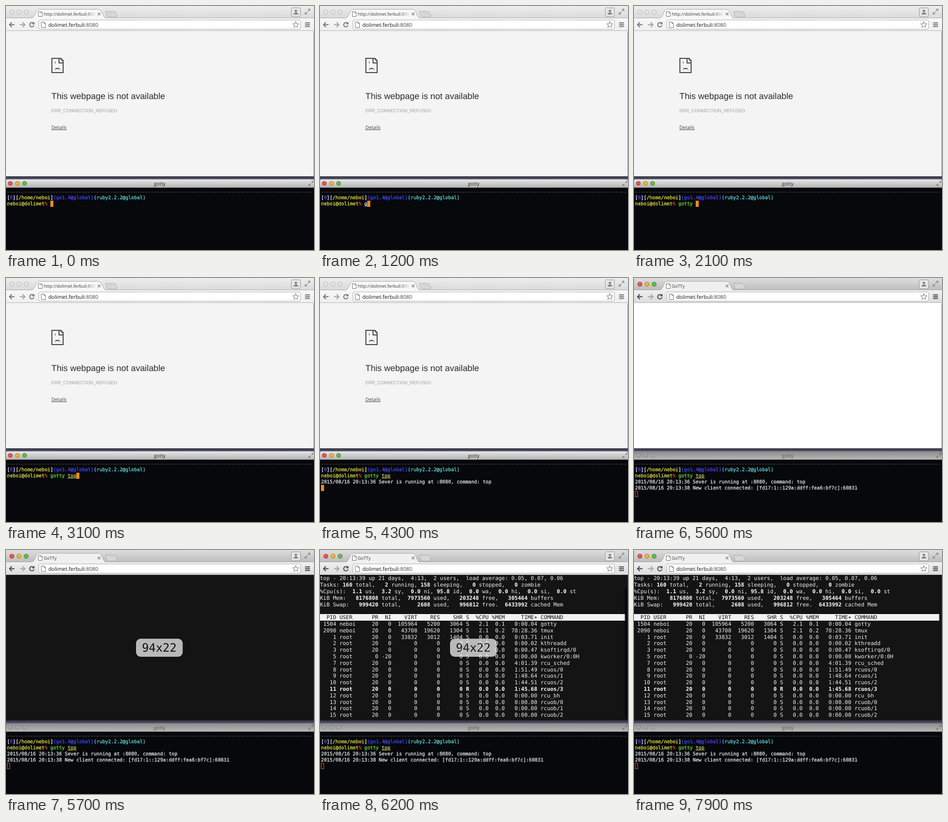
Animation of 604 by 480 pixels, one loop 8000 ms. Source, as an HTML page:

```html
<!DOCTYPE html>
<html lang="en">
<head>
<meta charset="utf-8">
<title>Terminal in the browser</title>
<style>
html, body { margin: 0; width: 604px; height: 480px; overflow: hidden; background: #07080c; }
svg { display: block; }
text { white-space: pre; text-rendering: geometricPrecision; }
.ui { font-family: "Open Sans", "Noto Sans", sans-serif; }
.err { font-family: "Liberation Sans", Arial, sans-serif; }
.mono { font-family: "DejaVu Sans Mono", monospace; }
.line { fill: none; stroke-linecap: round; stroke-linejoin: round; }
#shell { font-size: 9.41px; color: #dadada; }
#shell text, #shell tspan { fill: currentColor; stroke: currentColor; stroke-width: .35px; }
#top { font-size: 10.57px; fill: #f0f0f0; }
#top .b { font-weight: bold; fill: #fff; }
#top .head { fill: #111; }
.yellow { color: #d6d63e; }
.blue { color: #4343f5; }
.cyan { color: #5ad2d2; }
.red { color: #d8321e; }
.green { color: #62d234; }
.path { color: #c4cc5e; }
.white { color: #e8e8e8; }
.under { text-decoration: underline; }
#shell .under { text-decoration: underline .6px #9a9a48; }
</style>
</head>
<body>
<svg width="604" height="480" viewBox="0 0 604 480">
  <defs>
    <linearGradient id="stripOff" x2="0" y2="1"><stop stop-color="#ededed"/><stop offset="1" stop-color="#dadada"/></linearGradient>
    <linearGradient id="stripOn" x2="0" y2="1"><stop stop-color="#dedede"/><stop offset="1" stop-color="#bcbcbc"/></linearGradient>
    <linearGradient id="barOff" x2="0" y2="1"><stop stop-color="#f7f7f7"/><stop offset="1" stop-color="#efefef"/></linearGradient>
    <linearGradient id="barOn" x2="0" y2="1"><stop stop-color="#f0f0f0"/><stop offset="1" stop-color="#dcdcdc"/></linearGradient>
    <linearGradient id="titleOn" x2="0" y2="1"><stop stop-color="#e6e6e6"/><stop offset="1" stop-color="#b4b4b4"/></linearGradient>
    <linearGradient id="titleOff" x2="0" y2="1"><stop stop-color="#8c8c8c"/><stop offset="1" stop-color="#b6b6b6"/></linearGradient>
    <linearGradient id="gap" x2="0" y2="1"><stop stop-color="#2c2d3a"/><stop offset="1" stop-color="#626680"/></linearGradient>
    <linearGradient id="fade" gradientUnits="userSpaceOnUse" x1="74" x2="177"><stop offset=".8" stop-color="#333"/><stop offset="1" stop-color="#333" stop-opacity="0"/></linearGradient>
    <clipPath id="tabClip"><path d="M74 8H176V23H74Z"/></clipPath>
  </defs>

  <!-- shell window -->
  <rect y="335" width="604" height="7" fill="url(#gap)"/>
  <rect y="357" width="604" height="123" fill="#07080c"/>
  <path id="shellBar" d="M0 357V344Q0 341 3 341H601Q604 341 604 344V357Z"/>
  <path d="M0 357.5H604" stroke="#4b4b4b"/>
  <g id="shellLights"></g>
  <text id="shellTitle" class="ui" x="301.5" y="352.5" font-size="9.7" text-anchor="middle">gotty</text>
  <path class="line" stroke="#666" d="M599 348L602 345M599.5 345H602V347.5M597 350L594 353M594 350.5V353H596.5"/>
  <path d="M2 366.3H602" stroke="#4b4b40" stroke-dasharray="3.8 1.86"/>
  <g id="shell" class="mono">
    <text x="2" y="380"><tspan class="white">[</tspan><tspan class="blue">0</tspan><tspan class="white">][</tspan><tspan class="yellow">/home/neboi</tspan><tspan class="white">]</tspan><tspan class="blue">(go1.4@global)</tspan><tspan class="cyan">(ruby2.2.2@global)</tspan></text>
    <text x="2" y="392"><tspan class="yellow">neboi@dolimet</tspan><tspan class="red">%</tspan> <tspan id="cmd"></tspan><tspan id="arg" class="path under"></tspan></text>
    <text id="log1" x="2" y="404">2015/08/16 20:13:36 Sever is running at :8080, command: top</text>
    <text id="log2" x="2" y="416">2015/08/16 20:13:38 New client connected: [fd17:1::129a:ddff:fea6:bf7c]:60831</text>
  </g>
  <rect id="cursor" stroke="#f08c1e"/>

  <!-- browser window -->
  <rect id="strip" width="604" height="24"/>
  <g id="lights"></g>
  <path d="M196 10.5H212Q214 10.5 215 12.5L217.5 19Q218 21.5 215.5 21.5H202Q199 21.5 198 19L195.5 12.5Q195 10.5 196 10.5Z" fill="#d6d6d6" stroke="#a9a9a9" stroke-width=".8"/>
  <path d="M0 23.5H604" stroke="#adadad"/>
  <rect id="bar" y="24" width="604" height="25"/>
  <path id="tab" d="M50 24Q54 23 56 18.5L60 9.5Q61 6.5 64 6.5H182Q185 6.5 186.5 9.5L191 19Q192.5 23 196 24" stroke="#a4a4a4" stroke-width=".9"/>
  <g class="line" stroke="#777">
    <path d="M64 11H68.5L71 13.5V20.5H64ZM68.5 11V13.5H71" fill="#fff"/>
    <path d="M180.2 13.5L184.8 18.1M184.8 13.5L180.2 18.1" stroke-width="1.1"/>
  </g>
  <g clip-path="url(#tabClip)">
    <text id="tabText" class="ui" x="74" y="19" font-size="8.6"></text>
  </g>
  <rect x="559.5" y="3.5" width="18" height="17.5" rx="2" fill="#e4e4e4" stroke="#9c9c9c"/>
  <circle cx="568.5" cy="9.7" r="2.3" fill="#777"/>
  <path d="M564 16.5Q564 13 568.5 13T573 16.5Z" fill="#777"/>
  <path class="line" stroke="#858585" stroke-width="1.2" d="M592 10L596 6M592.5 6H596V9.5M590.5 12L586.5 16M586.5 12.5V16H590"/>

  <g class="line" stroke-width="1.9">
    <path id="back" d="M16 36.8H7M11 32.5L6.8 36.8L11 41"/>
    <path d="M28 36.8H37M33 32.5L37.2 36.8L33 41" stroke="#a3a3a3"/>
    <path id="reload" d="M54 34A4.3 4.3 0 1 0 54.7 38.5"/>
    <path id="menu" stroke-linecap="butt" d="M586.5 33.2H596M586.5 36.7H596M586.5 40.2H596"/>
  </g>
  <path id="reloadTip" d="M55.8 31V36H50.8Z"/>
  <rect x="64.5" y="27.5" width="513" height="18" rx="2.5" fill="#fff" stroke="#b3b3b3"/>
  <path class="line" stroke="#777" d="M69.5 31.5H74.5L77.5 34.5V42.5H69.5ZM74.5 31.5V34.5H77.5"/>
  <text class="ui" x="83" y="40.6" font-size="10.4" fill="#111">dolimet.ferbuli<tspan fill="#444">:8080</tspan></text>
  <path id="star" class="line" stroke="#777"/>
  <path d="M0 48.5H604" stroke="#b5b5b5"/>

  <g id="errorPage">
    <rect y="49" width="604" height="286" fill="#f4f4f4"/>
    <g fill="none" stroke="#4c4c4c" stroke-width="1.8" shape-rendering="crispEdges">
      <path d="M90 103H108V105H110V107H112V131H90ZM104 103V112H112"/>
      <path d="M96.5 109V113M97 123H105M95.5 125.5H97.5M104.5 125.5H106.5"/>
    </g>
    <g class="err">
      <text x="89" y="182.5" font-size="17" fill="#2b2b2b">This webpage is not available</text>
      <text x="89" y="209" font-size="9.2" letter-spacing="-.3" fill="#a3a3a3">ERR_CONNECTION_REFUSED</text>
    </g>
    <text class="ui under" x="89" y="242" font-size="9.4" fill="#444">Details</text>
  </g>
  <rect id="blank" y="49" width="604" height="286" fill="#fff"/>
  <rect id="dark" y="49" width="604" height="286" fill="#141414"/>
  <g id="top" class="mono"><rect y="126" width="598.5" height="13" fill="#f2f2f2"/></g>
  <rect id="thumb" x="597.5" y="75" width="5" height="256" rx="2.5"/>
  <g id="size">
    <rect x="255" y="174.5" width="91.5" height="35.5" rx="9" fill="#f0f0f0"/>
    <text class="mono" x="300.5" y="200" font-size="22.6" text-anchor="middle" fill="#101010">94x22</text>
  </g>
  <path d="M603.5 50V335M0 335.5H604" stroke="#3c3d48" stroke-opacity=".6"/>
</svg>
<script>
const LOOP = 8000, ROW = 12.8, CHAR = 5.665;
const $ = id => document.getElementById(id);
const add = (parent, tag, attrs, text = '') => {
  const el = document.createElementNS('http://www.w3.org/2000/svg', tag);
  for (const k in attrs) el.setAttribute(k, attrs[k]);
  el.textContent = text;
  return parent.appendChild(el);
};
const set = (id, attrs) => { for (const k in attrs) $(id).setAttribute(k, attrs[k]); };
const show = (id, on) => $(id).style.display = on ? '' : 'none';

// window buttons
const LIGHTS = [['#e8574c', '#a8332c'], ['#efb53c', '#a87a20'], ['#68bb48', '#3d7f2a']];
const lamps = (id, x, y, r) => LIGHTS.map((_, i) => add($(id), 'circle', { cx: x + i * 14, cy: y, r }));
const webLamps = lamps('lights', 11.5, 12.3, 4.1);
const shellLamps = lamps('shellLights', 8.5, 349, 4);
const paint = (list, on, off, edge) => list.forEach((el, i) => {
  el.setAttribute('fill', on ? LIGHTS[i][0] : off);
  el.setAttribute('stroke', on ? LIGHTS[i][1] : edge);
});

// bookmark star
set('star', { d: 'M' + Array.from({ length: 10 }, (_, i) => {
  const a = i * Math.PI / 5, r = i % 2 ? 2.8 : 6.4;
  return (568.3 + r * Math.sin(a)).toFixed(2) + ' ' + (37 - r * Math.cos(a)).toFixed(2);
}).join('L') + 'Z' });

// process list; text between asterisks is bold
const proc = (pid, time, cmd, { user = 'root', pr = 20, ni = 0, mem = [0, 0, 0], s = 'S', use = ['0.0', '0.0'] } = {}) => {
  const cols = [[pr, 3], [ni, 4], [mem[0], 8], [mem[1], 7], [mem[2], 7], [s, 2], [use[0], 6], [use[1], 5], [time, 10]];
  const line = String(pid).padStart(5) + ' ' + user.padEnd(9) +
    cols.map(([v, w]) => String(v).padStart(w)).join('') + ' ' + cmd;
  return s === 'R' ? `*${line}*` : line;
};
const rows = [
  'top - 20:13:39 up 21 days,  4:13,  2 users,  load average: 0.05, 0.07, 0.06',
  'Tasks: *160* total, *  2* running, *158* sleeping, *  0* stopped, *  0* zombie',
  '%Cpu(s): * 1.1* us, * 3.2* sy, * 0.0* ni, *95.8* id, * 0.0* wa, * 0.0* hi, * 0.0* si, * 0.0* st',
  'KiB Mem: *  8176808* total, * 7973560* used, *  203248* free, *  305464* buffers',
  'KiB Swap:*   999420* total, *    2608* used, *  996812* free. * 6433992* cached Mem',
  '',
  '  PID USER      PR  NI    VIRT    RES    SHR S  %CPU %MEM     TIME+ COMMAND',
  proc(1504, '0:00.04', 'gotty', { user: 'neboi', mem: [105964, 5200, 3064], use: ['2.1', '0.1'] }),
  proc(2090, '78:28.36', 'tmux', { user: 'neboi', mem: [43708, 19620, 1304], use: ['2.1', '0.2'] }),
  proc(1, '0:03.71', 'init', { mem: [33832, 3012, 1404] }),
  proc(2, '0:00.02', 'kthreadd'),
  proc(3, '0:00.47', 'ksoftirqd/0'),
  proc(5, '0:00.00', 'kworker/0:0H', { pr: 0, ni: -20 }),
  proc(7, '4:01.39', 'rcu_sched'),
  proc(8, '1:51.49', 'rcuos/0'),
  proc(9, '1:48.64', 'rcuos/1'),
  proc(10, '1:44.51', 'rcuos/2'),
  proc(11, '1:45.68', 'rcuos/3', { s: 'R' }),
  proc(12, '0:00.00', 'rcu_bh'),
  proc(13, '0:00.00', 'rcuob/0'),
  proc(14, '0:00.00', 'rcuob/1'),
  proc(15, '0:00.00', 'rcuob/2')
];
rows.forEach((row, i) => {
  const line = add($('top'), 'text', { x: 0, y: 59.4 + i * ROW, class: i === 6 ? 'head' : '' });
  row.split('*').forEach((part, j) => part && add(line, 'tspan', j % 2 ? { class: 'b' } : {}, part));
});

// times in ms
const TYPED = 'gotty top', KEYS = [1200, 1300, 1500, 1700, 1800, 2100, 2500, 2800, 3000];
const ENTER = 3300, SERVE = 3400, FOCUS = 4600, LOAD = 5200, CLIENT = 5300, TERM = 5700, LIST = 5900;
const THUMB_FADE = 6800, SIZE_FADE = 7100, STEP = 100;

function draw(t) {
  const web = t >= FOCUS, loaded = t >= LOAD;
  const n = KEYS.filter(k => t >= k).length;

  $('cmd').textContent = TYPED.slice(0, Math.min(n, 6));
  $('cmd').setAttribute('class', n < 5 ? 'white under' : 'green');
  $('arg').textContent = TYPED.slice(6, n);
  show('log1', t >= SERVE);
  show('log2', t >= CLIENT);

  const row = t < ENTER ? 1 : t < SERVE ? 2 : t < CLIENT ? 3 : 4;
  const col = row === 1 ? 15 + n : 0;
  set('cursor', {
    x: 2.5 + col * CHAR, y: 371.5 + row * 12, width: 4.9, height: 11,
    fill: web ? 'none' : '#f08c1e', 'stroke-opacity': web ? .75 : 1
  });

  set('shellBar', { fill: web ? 'url(#titleOff)' : 'url(#titleOn)' });
  set('shellTitle', { fill: web ? '#5c5c5c' : '#2c2c2c' });
  set('strip', { fill: web ? 'url(#stripOn)' : 'url(#stripOff)' });
  set('bar', { fill: web ? 'url(#barOn)' : 'url(#barOff)' });
  set('tab', { fill: web ? '#f0f0f0' : '#f7f7f7' });
  const ink = web ? '#484848' : '#757575';
  ['back', 'reload', 'menu'].forEach(id => set(id, { stroke: ink }));
  set('reloadTip', { fill: ink });
  paint(webLamps, web, '#e6e6e6', '#b2b2b2');
  paint(shellLamps, !web, '#a6a6a6', '#858585');

  $('tabText').textContent = loaded ? 'GoTTy' : 'http://dolimet.ferbuli:8080';
  set('tabText', { fill: loaded ? '#333' : 'url(#fade)' });
  show('errorPage', !loaded);
  show('blank', loaded && t < TERM);
  show('dark', t >= TERM);
  show('top', t >= LIST);
  show('thumb', t >= LIST && t < THUMB_FADE + STEP);
  set('thumb', { opacity: t < THUMB_FADE ? .55 : .25 });
  show('size', t >= TERM && t < SIZE_FADE + STEP);
  set('size', { opacity: t < SIZE_FADE ? .75 : .35 });
}

function tick() {
  draw(performance.now() % LOOP);
  requestAnimationFrame(tick);
}
tick();
</script>
</body>
</html>
```
